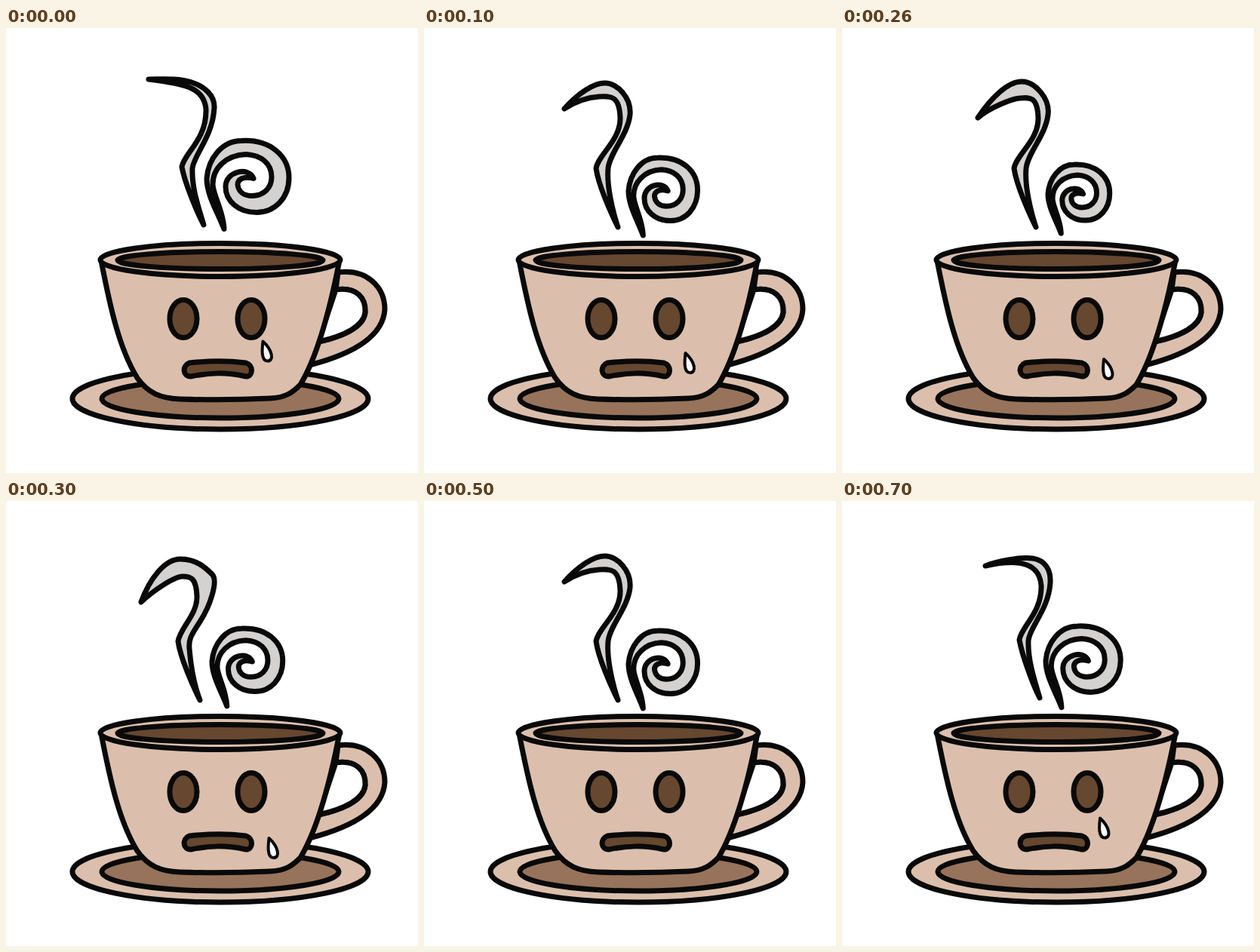
Animation, 546 px wide and 590 px high, one loop 800 ms. Source, as an HTML page:

```html
<!DOCTYPE html>
<html lang="en">
<head>
<meta charset="utf-8">
<title>Sad coffee cup</title>
<style>
  html, body { margin: 0; height: 100%; overflow: hidden; background: #fff; }
  svg { display: block; width: 546px; height: 590px; }
  svg * { vector-effect: non-scaling-stroke; }
</style>
</head>
<body>
<svg viewBox="0 0 546 590" fill="#dbbfac" stroke="#090909" stroke-width="7" stroke-linejoin="round" stroke-linecap="round">
  <!-- saucer -->
  <ellipse cx="284" cy="491.500" rx="196" ry="40.5"/>
  <ellipse cx="284" cy="491.500" rx="157" ry="25.5" fill="#97735b"/>
  <!-- handle -->
  <path d="M440 324C480 319 502 345 502 373C500 405 468 430 402 447L414 416C450 408 474 395 476 377C477 358 465 343 437 347Z"/>
  <path d="M437 347C465 343 477 358 476 377C474 395 450 408 414 416Z" fill="#fff"/>
  <!-- cup -->
  <path d="M126 308C138 370 150 425 174 464C188 484 205 491 230 492Q290 494 350 491C372 490 381 482 390 473C410 440 428 380 442 308Z"/>
  <ellipse cx="284" cy="307.500" rx="159" ry="22"/>
  <g fill="#664730">
    <ellipse cx="284" cy="308" rx="136" ry="11.5"/>
    <ellipse cx="235" cy="385.5" rx="18" ry="25"/>
    <ellipse cx="325" cy="385.5" rx="18" ry="25"/>
    <path d="M243 444C270 441 295 441 318 444C328 447 328 462 318 462C290 456 270 457 245 462C234 462 233 448 243 444Z"/>
  </g>
  <path id="tear" d="M0 0C-1 9-3 26 6 26C15 26 13 12 0 0Z" fill="#f8fbfc" stroke-width="4"/>
  <!-- steam -->
  <g fill="#d3d2d0">
    <path id="wisp"/>
    <path id="swirl" d="M23 117C14 94 0 72 0 50C2 24 20 0 46 0C84-2 109 20 109 49C109 76 90 95 66 95C42 95 25 80 25 61C25 40 56 34 62 50C48 46 41 52 41 58C42 68 50 73 60 73C76 73 86 62 86 48C86 30 72 19 52 18C26 19 8 36 8 58C9 74 22 92 23 117Z"/>
  </g>
</svg>
<script>
  // wisp: outline; swirl: left, top, x scale, y scale
  const poses = [
    { wisp: 'M189 68C205 68 228 66 246 72S277 90 276 106C274 144 249 168 247 186C246 214 256 240 262 261C254 246 237 206 233 184C236 166 266 148 265 108C263 80 240 74 189 68Z',
      swirl: [266, 149.5, 1, 1] },
    { wisp: 'M186 107C205 86 226 72 241 73S275 92 273 115C270 142 246 166 244 186C242 208 249 240 257 264C248 246 231 208 228 186C231 168 261 148 260 119S248 90 232 91S200 98 186 107Z',
      swirl: [271, 172, .84, .88] },
    { wisp: 'M180 119C198 92 220 71 238 71S276 94 273 115C270 142 246 166 244 186C242 208 249 240 257 264C248 246 231 208 228 186C231 168 261 148 260 119S248 92 236 93S195 106 180 119Z',
      swirl: [273, 181, .75, .78] },
    { wisp: 'M179 134C190 104 210 77 231 77S264 88 273 97S270 140 257 160S242 184 243 196S247 238 257 264C248 246 231 208 228 186C231 168 254 150 253 126S245 100 234 100S195 119 179 134Z',
      swirl: [273, 169, .86, .88] },
    { wisp: 'M190 86C205 80 236 74 252 76S277 90 276 108C274 144 249 166 247 185C246 212 256 240 262 261C254 246 239 206 235 184C238 166 265 148 264 112C262 85 240 75 190 86Z',
      swirl: [270, 166, .91, .92] }
  ];
  const order = [0, 1, 2, 3, 2, 1, 1, 4];
  const tears = { 7: [342, 420.5], 0: [340.5, 415.5], 1: [346.5, 431], 2: [347, 439], 3: [348.5, 447] };
  const [tear, wisp, swirl] = ['tear', 'wisp', 'swirl'].map(id => document.getElementById(id));

  function draw() {
    const step = Math.floor(performance.now() / 100) % order.length;
    const pose = poses[order[step]];
    const [x, y, sx, sy] = pose.swirl;
    wisp.setAttribute('d', pose.wisp);
    swirl.setAttribute('transform', `translate(${x} ${y}) scale(${sx} ${sy})`);
    const drop = tears[step];
    tear.style.display = drop ? '' : 'none';
    if (drop) tear.setAttribute('transform', `translate(${drop})`);
    requestAnimationFrame(draw);
  }
  draw();
</script>
</body>
</html>
```
